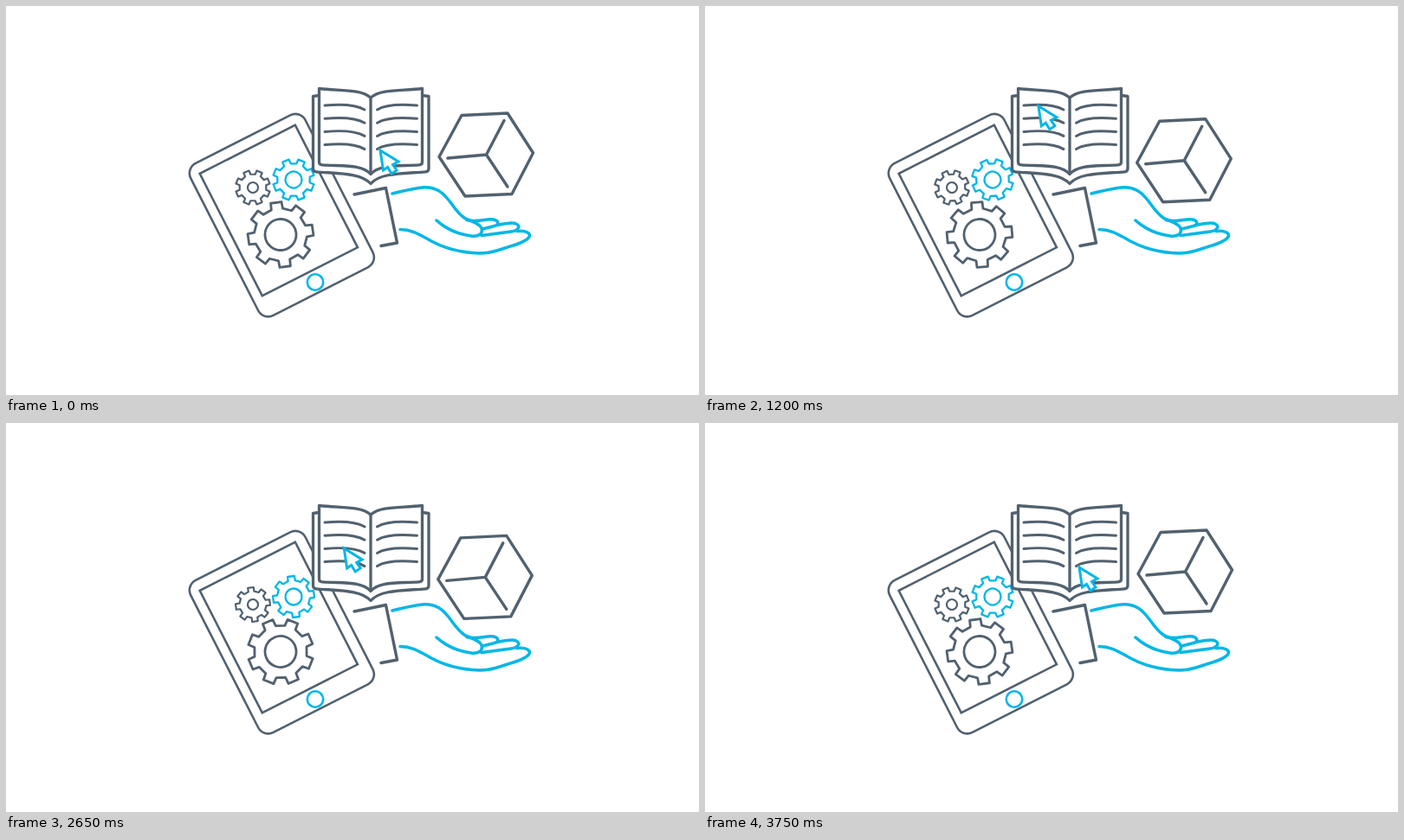
Recreate the animation shown at these times as an HTML page. Size 800 by 450 pixels, loop 3800 ms.

```html
<!DOCTYPE html>
<html lang="en">
<head>
<meta charset="utf-8">
<title>Learning tools</title>
<style>
  html, body { margin: 0; width: 100%; height: 100%; overflow: hidden; background: #fff; }
  svg { display: block; width: 800px; height: 450px; }
  .line { fill: none; stroke: #52616f; stroke-linecap: round; stroke-linejoin: round; }
  .cyan { stroke: #00b7e6; }
  .solid { fill: #fff; }
</style>
</head>
<body>
<svg viewBox="0 0 800 450">
  <g class="line" stroke-width="2.6" transform="rotate(-27)">
    <rect x="99.5" y="261.5" width="148.5" height="197.5" rx="13"/>
    <rect x="111.3" y="274.3" width="123.6" height="158.8" stroke-linejoin="miter"/>
  </g>
  <circle class="line cyan" stroke-width="2.6" cx="357" cy="319.5" r="9.2"/>
  <g id="gears"></g>

  <g class="line" stroke-width="3.3">
    <path class="solid" d="M361 103.5L354.5 104.5V188Q354.5 191.500 358 191.800C385 194 410 193 421 205.500C432 193 457 194 484.500 191.800Q488 191.500 488 188V104.500L481 103.500"/>
    <path class="solid" d="M361.5 95.500C385 98.500 409 95.500 421 106C433 95.500 457 98.500 480.500 95.500V180.500Q480.500 183.500 477 183.800C452 185.500 431 183 421 194.500C411 183 390 185.500 365 183.800Q361.500 183.500 361.500 180.500Z"/>
    <path d="M421 106V194"/>
    <g id="text" stroke-width="3"></g>
  </g>

  <path class="line" stroke-width="3.4" d="M402 218L438.500 210.500L451.500 274L433 277.500"/>
  <g class="line cyan" stroke-width="3.5">
    <path d="M446 217C472 211 486 206 500 214C513 222 516 236 529 245C535 249 546 250 549 257C551 264 545 267 537 266C521 264 507 257 497 248"/>
    <path d="M532 247.500C545 251 556 245 563 247C570 249 569 254 562 255L550 258"/>
    <path d="M567 253.500C575 252 583 250 588 251.500C596 255 590 260 583 261L549 265.500"/>
    <path d="M590 260.500C600 259 606 263 604 267C601 273 585 277 576 280C562 285 552 287 538 285.500C520 284 504 279 491 272C479 265.500 470 258.500 455 258.500"/>
  </g>

  <g id="cube" class="line" stroke-width="3.4">
    <path d="M526 126.500L579 124L608.500 170L584 217.500L530 220L500 174.500Z"/>
    <path d="M575 132.500L554.500 172L510 176M554.500 172L579 209"/>
  </g>
  <path id="cursor" class="line cyan solid" stroke-width="3" style="stroke-linejoin:miter"
        d="M0 0L3.500 23L8.500 19.500L13 27L19 23L14.500 16.500L21 13Z"/>
</svg>
<script>
  const LOOP = 3800, SPAN = 3750, STEP = 50, TEETH = 8;
  const $ = id => document.getElementById(id);

  function add(parent, tag, attrs) {
    const el = document.createElementNS(parent.namespaceURI, tag);
    for (const k in attrs) el.setAttribute(k, attrs[k]);
    return parent.appendChild(el);
  }

  function gearPath(outer, root) {
    const points = [];
    for (let i = 0; i < TEETH; i++) {
      for (const [r, deg] of [[root, -12.5], [outer, -9.5], [outer, 9.5], [root, 12.5]]) {
        const a = (i * 360 / TEETH + deg - 90) * Math.PI / 180;
        points.push((r * Math.cos(a)).toFixed(2) + ' ' + (r * Math.sin(a)).toFixed(2));
      }
    }
    return 'M' + points.join('L') + 'Z';
  }

  const gears = [
    { x: 317, y: 264.5, outer: 38, root: 30.5, hub: 18, width: 2.8, phase: -8, dir: -1 },
    { x: 285, y: 210, outer: 20, root: 15.5, hub: 6, width: 2.2, phase: 22.5, dir: 1 },
    { x: 332, y: 201, outer: 24, root: 19, hub: 9.5, width: 2.3, phase: 22.5, dir: 1, color: ' cyan' }
  ];
  for (const g of gears) {
    g.el = add($('gears'), 'g', { class: 'line' + (g.color || ''), 'stroke-width': g.width });
    add(g.el, 'path', { d: gearPath(g.outer, g.root) });
    add(g.el, 'circle', { r: g.hub });
  }

  for (let i = 0; i < 4; i++) {
    const y = 115 + i * 15.2;
    add($('text'), 'path', {
      d: `M368 ${y}C385 ${y - 1.5} 404 ${y - 1} 414 ${y + 5}M474.5 ${y}C457 ${y - 1.5} 438 ${y - 1} 428.5 ${y + 5}`
    });
  }

  // Cursor stops: time, x, y
  const stops = [
    [0, 432, 167], [900, 372, 114.2], [1000, 372, 114.2], [1900, 474, 126],
    [2100, 474, 126], [2700, 388.5, 145.3], [3100, 388.5, 145.3], [SPAN, 432, 167]
  ];
  const ease = f => f * f * (3 - 2 * f);

  function cursorAt(t) {
    const i = Math.max(1, stops.findIndex(s => s[0] >= t));
    const [t0, x0, y0] = stops[i - 1], [t1, x1, y1] = stops[i];
    const f = ease((t - t0) / (t1 - t0));
    return [x0 + (x1 - x0) * f, y0 + (y1 - y0) * f];
  }

  const move = (el, x, y, turn = 0) =>
    el.setAttribute('transform', `translate(${x} ${y}) rotate(${turn})`);

  function draw(now) {
    const t = Math.floor(now % LOOP / STEP) * STEP;
    const u = t / SPAN;
    for (const g of gears) move(g.el, g.x, g.y, g.phase + g.dir * 360 * ease(u));
    const drop = 4 * u * (1 - u);
    move($('cube'), -1.5 * drop, 7.7 * drop);
    move($('cursor'), ...cursorAt(t));
    requestAnimationFrame(draw);
  }
  draw(0);
</script>
</body>
</html>
```
